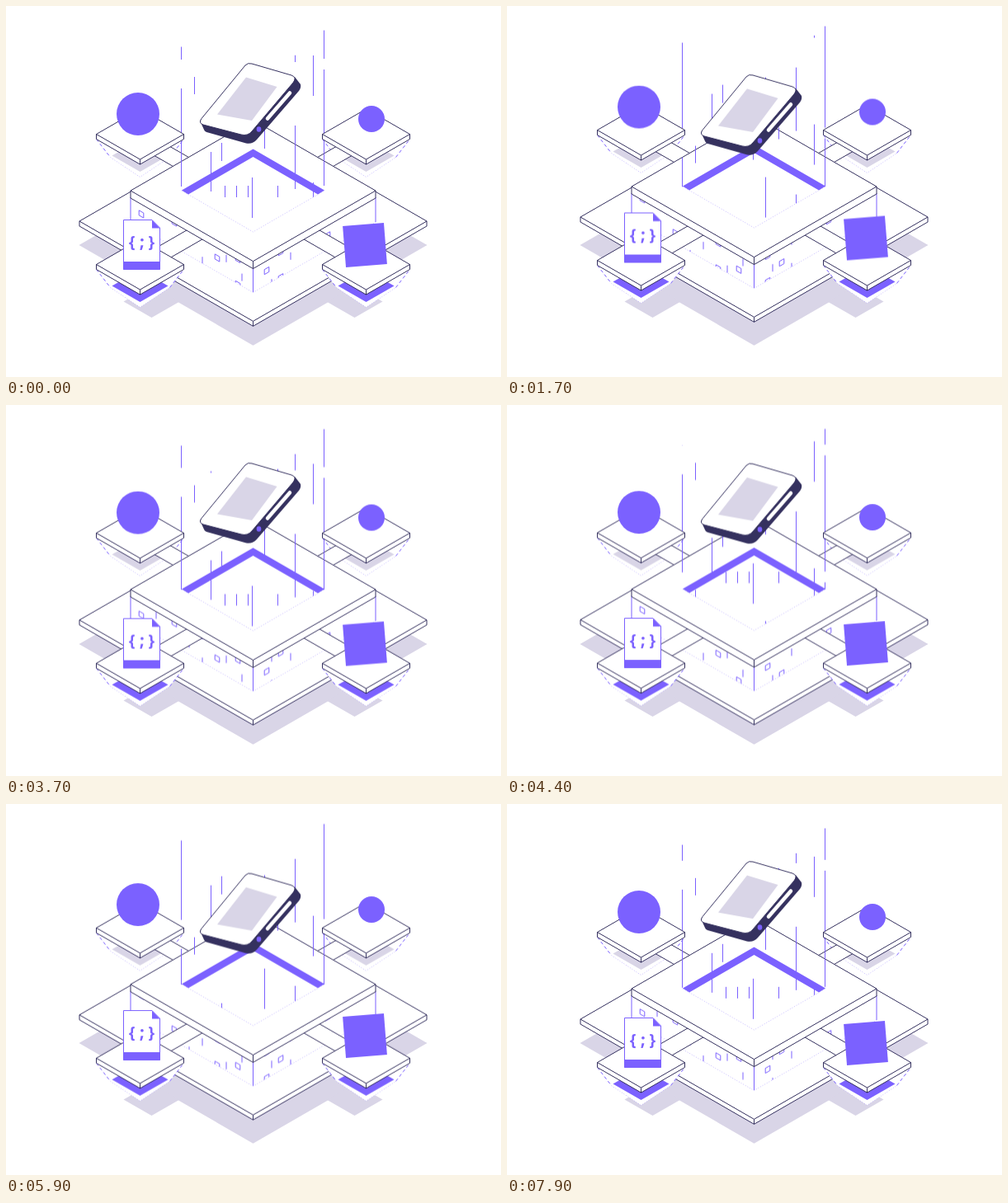
Animation of 600x450 px, one loop 8 s. Source, as an HTML page:

```html
<!DOCTYPE html>
<html lang="en">
<head>
<meta charset="utf-8">
<title>Floating platform</title>
<style>
html, body { margin: 0; width: 100%; height: 100%; overflow: hidden; background: #fff; }
svg { display: block; width: 600px; height: 450px; }
.face { fill: #fff; stroke: #35315f; stroke-width: 1; stroke-linejoin: round; }
.white { fill: #fff; }
.thin { fill: none; stroke: #7b61ff; stroke-width: 1; }
.dots { fill: none; stroke: #7b61ff; stroke-width: .7; stroke-dasharray: 1 2; opacity: .6; }
.dash { fill: none; stroke: #7b61ff; stroke-width: 1; stroke-dasharray: 4 3; }
.purple { fill: #7b61ff; }
.dark { fill: #35315f; }
.soft { fill: #d9d5e7; }
.float { animation: float 2s cubic-bezier(.37, 0, .63, 1) infinite alternate; }
.base { --to: -5.3px; }
.icons { --to: -9px; }
.device { --to: 14.6px; }
.rise { animation: rise 4s linear infinite; }
.rain { --by: -154px; }
.bits { --by: -31px; }
@keyframes float { to { transform: translateY(var(--to)); } }
@keyframes rise { to { transform: translateY(var(--by)); } }
text { font: 700 20px "Noto Sans Mono", "DejaVu Sans Mono", monospace; text-anchor: middle; }
</style>
</head>
<body>
<svg viewBox="0 0 600 450">
  <defs>
    <clipPath id="wallClip"><path d="M151 233 299.5 318.5 448 233V262L299.5 347.5 151 262Z"/></clipPath>
    <clipPath id="rainClip"></clipPath>
  </defs>

  <g id="shadow"></g>

  <g class="float base">
    <g id="ground"></g>
    <g clip-path="url(#wallClip)"><g class="rise bits" id="bits"></g></g>
    <path class="dots" d="M151 262 299.5 347.5 448 262"/>
    <path class="thin" d="M151 232V262M299.5 318V347M448 232V262"/>
    <g id="cones"></g>
    <g id="beams"></g>
    <g id="slab"></g>
    <path class="dots" d="M213 224 299.5 274 386 224"/>
    <path class="purple" d="M213 223.5 299.5 173.5 386 223.5 378 228.5 299.5 183 221 228.5Z"/>
    <g clip-path="url(#rainClip)"><g class="rise rain" id="rain"></g></g>
    <g id="tiles"></g>
  </g>

  <g class="float icons">
    <circle class="purple" cx="160" cy="131" r="26"/>
    <circle class="purple" cx="443" cy="137" r="16"/>
    <path d="M142.5 259.5H177L186.5 269V319.5H142.5Z" fill="#fff" stroke="#7b61ff"/>
    <path class="purple" d="M177 259.5 186.5 269.5H177ZM142.5 310H186.5V320H142.5Z"/>
    <text class="purple" x="164.5" y="292.5">{;}</text>
    <rect class="purple" x="410" y="265" width="50" height="50" transform="rotate(-4.5 435 290)"/>
  </g>

  <g class="float device">
    <path class="dark" d="M235 139 240 150Q241 152.500 245 153.500L291 166.500Q299 168 304 162L355 103Q358 99 357 95L350 86Z"/>
    <path class="face" d="M290 72Q293 68.500 298 70L346 84Q353 86.500 348 93L298 152Q293 158 285 156L239 144Q233 142 237 136.500Z"/>
    <path class="soft" d="M291 86.500 328.500 98 298 139 256 131.500Z"/>
    <path d="M317 136.500 344 105.500" stroke="#fff" stroke-width="4.500" stroke-linecap="round"/>
    <ellipse class="purple" cx="306.500" cy="149.500" rx="2.800" ry="3.300"/>
  </g>
</svg>

<script>
const K = 0.5765, MID = 299.5, RAIN = 154, BITS = 31;
const add = (id, html) => document.getElementById(id).insertAdjacentHTML('beforeend', html);
const path = (cls, d) => `<path class="${cls}" d="${d}"/>`;
const off = x => Math.abs(x - MID);

const rhomb = (cls, cx, cy, r) =>
  path(cls, `M${cx - r} ${cy}L${cx} ${cy + r * K} ${cx + r} ${cy}L${cx} ${cy - r * K}Z`);

// Isometric slab: top centre, half width, thickness
function slab(cx, cy, r, h) {
  const b = cy + r * K;
  return path('face', `M${cx - r} ${cy}v${h}L${cx} ${b + h} ${cx + r} ${cy + h}v${-h}Z`) +
    rhomb('face', cx, cy, r) + path('face', `M${cx} ${b}v${h}`);
}

// Beam from under a tile towards the middle
function beam(cx, cy, sx, sy) {
  const at = (side, len) => `${cx + sx * (len + side * 9.5)} ${cy + sy * (len - side * 9.5) * K} `;
  return path('face', 'M' + at(-1, 0) + at(-1, 90) + at(1, 90) + at(1, 0) + 'Z');
}

// Underside of a tile: dashed funnel with a coloured layer
function cone(cx, cy, cls) {
  const pt = (dx, dy) => `${cx + dx} ${cy + dy} `;
  const left = pt(-53, 6) + pt(-36, 28), right = pt(36, 28) + pt(53, 6);
  return path('white', 'M' + left + pt(0, 52) + right + 'Z') +
    path('dash', 'M' + left + 'M' + right) +
    path('dots', 'M' + pt(-36, 28) + pt(0, 52) + pt(36, 28)) +
    rhomb(cls, cx, cy + 26, 34);
}

add('shadow', rhomb('soft', MID, 290, 211));
add('ground', slab(MID, 261, 210.5, 6));
add('slab', slab(MID, 224, 148.5, 9));

for (const side of [-1, 1]) {
  const x = MID + side * 137;
  add('shadow', rhomb('soft', MID + side * 123, 358.5, 34));
  for (const [y, cls, drop, dir] of [[155.5, 'soft', 5, 1], [313.5, 'purple', 2, -1]]) {
    add('cones', cone(x, y, cls));
    add('beams', beam(x, y + drop, -side, dir));
    add('tiles', slab(x, y, 53, 6));
  }
}

// A column of equal strokes, clipped between a sloping top and the floor
function column(x, start, len) {
  const top = (x < MID ? 124 : 104) - off(x) * .86, floor = 274 - off(x) * K;
  add('rainClip', `<rect x="${x - 2}" y="${top}" width="3" height="${floor - top}"/>`);
  for (let k = -1; k < 3; k++)
    add('rain', path('thin', `M${x - .5} ${start + k * RAIN}v${len}`));
}
column(213, 100, 119);
column(386, 77, 141);
column(229, 86, 21);
column(373, 60, 49);
column(249, 177, 48);
column(351, 145, 77);
column(262, 166, 22);
column(314, 124, 49);
column(299, 208, 49);
for (const x of [266, 280, 294, 330]) column(x, 218, 14);

// Windows and sticks climb the walls; phase is the height at the start
function climb(x, phase, shape) {
  const y = 347 - off(x) * K - BITS * phase;
  for (const top of [y, y + BITS]) add('bits', path('thin', `M${x} ${top}${shape}`));
}
[164, 204, 256, 281, 316, 333, 390].forEach((x, i) => {
  const s = x < MID ? 1.6 : -1.6;
  climb(x, i % 2 ? .95 : .53, `m-2.8 ${-3 - s}l5.6 ${2 * s}v6l-5.6 ${-2 * s}z`);
});
[182, 222, 238, 267, 286, 322, 345].forEach((x, i) => climb(x, i * .618 % 1, 'v9'));
</script>
</body>
</html>
```
